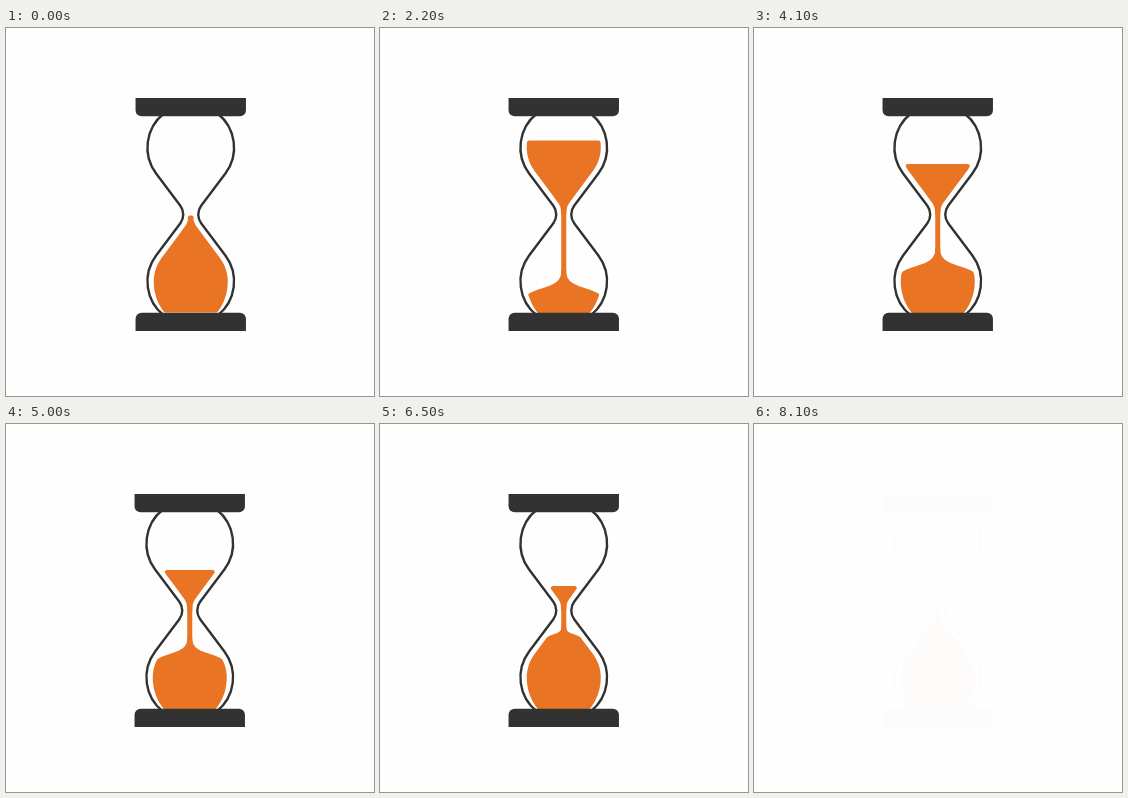
Animation, 368 px wide and 368 px high, one loop 8200 ms. Source, as an HTML page with a canvas:

```html
<!DOCTYPE html>
<html lang="en">
<head>
<meta charset="utf-8">
<title>Hourglass</title>
<style>
html, body { margin: 0; width: 100%; height: 100%; overflow: hidden; background: #fefefe; }
canvas { display: block; width: 368px; height: 368px; }
</style>
</head>
<body>
<canvas id="stage"></canvas>
<script>
const SIZE = 368, LOOP = 8200, STEP = 100;
const DARK = '#323232', SAND = '#e87424', PAPER = '#fefefe';
const canvas = document.getElementById('stage');
const ctx = canvas.getContext('2d');
const scale = Math.max(1, window.devicePixelRatio || 1);
canvas.width = canvas.height = SIZE * scale;

// Geometry is measured from the neck; the bulbs sit above and below it.
const BULB_Y = 67, GLASS_R = 43.3, SAND_R = 37, SAND_RY = 43, STREAM = 2.5, ROUND = 2;

// Distance of each sand surface from the neck, as [seconds, distance].
const LEVEL = [[0, 98], [1, 86.5], [2.2, 74], [4.1, 50.5], [5, 40.5], [6.5, 24.5], [7.3, 14], [7.8, 2.5]];
const MOUND = [[0.4, 99], [1, 91.5], [2.2, 79.5], [4.1, 57.5], [5, 48.5], [6.5, 26.5], [7.8, 11]];
const TIP = [[0.25, -3], [0.75, 98]];
const FADE = [[7.9, 1], [8, 0.4], [8.1, 0.012]];

function track(keys, t) {
  if (t <= keys[0][0]) return keys[0][1];
  for (let i = 1; i < keys.length; i++) {
    const [t0, v0] = keys[i - 1], [t1, v1] = keys[i];
    if (t <= t1) return v0 + (v1 - v0) * (t - t0) / (t1 - t0);
  }
  return keys[keys.length - 1][1];
}

const ease = p => p < 0.5 ? 2 * p * p : 1 - 2 * (1 - p) * (1 - p);

// Half width of the sand body at distance d from the neck.
function halfWidth(d) {
  const dy = d - BULB_Y;
  if (dy > 0) return SAND_R * Math.sqrt(1 - (dy / SAND_RY) ** 2);
  if (dy > -0.6 * SAND_R) return Math.sqrt(SAND_R ** 2 - dy * dy);
  const cone = (0.6 * d - 3.2) / 0.8;
  return (cone + STREAM + Math.hypot(cone - STREAM, 2.4)) / 2;
}

// Fills a mirrored profile of [half width, y] points with softened corners.
function fillProfile(points) {
  ctx.beginPath();
  for (const [x, y] of points) ctx.lineTo(Math.max(0.3, x - ROUND), y);
  for (const [x, y] of points.slice().reverse()) ctx.lineTo(-Math.max(0.3, x - ROUND), y);
  ctx.closePath();
  ctx.fill();
  ctx.stroke();
}

function drawUpperSand(t) {
  const top = -track(LEVEL, t) + ROUND;
  const end = Math.min(track(TIP, t), track(MOUND, t));
  const points = [];
  for (let y = top; y < end; y++) points.push([y < 0 ? halfWidth(-y) : STREAM, y]);
  points.push([end < 0 ? halfWidth(-end) : STREAM, end]);
  fillProfile(points);
}

function drawMound(t) {
  const y0 = track(MOUND, t);
  if (t < 0.6) return;
  const w = halfWidth(y0), points = [];
  for (let i = 0; i <= 24; i++) {
    const u = i / 24, v = 1 - u;
    const a = v * v * v, b = 3 * v * v * u, c = 3 * v * u * u, d = u * u * u;
    points.push([
      a * STREAM + b * STREAM + c * 0.55 * w + d * w,
      y0 + ROUND / 2 - w * (a * 0.68 + b * 0.2 + c * 0.22)
    ]);
  }
  for (let y = y0 + 2; y < 102; y++) points.push([halfWidth(y), y]);
  fillProfile(points);
}

function drawGlass() {
  const neck = 7.5;
  const offset = GLASS_R - 0.6 * BULB_Y;
  const r = (0.8 * neck - offset) / 0.2;
  const rim = Math.atan2(-34, -Math.sqrt(GLASS_R ** 2 - 34 ** 2));
  const side = Math.atan2(0.6, -0.8), bend = Math.atan2(0.6, 0.8);
  ctx.lineWidth = 2.4;
  ctx.strokeStyle = DARK;
  for (const flip of [1, -1]) {
    ctx.save();
    ctx.scale(flip, 1);
    ctx.beginPath();
    ctx.arc(0, -BULB_Y, GLASS_R, rim, side, true);
    ctx.arc(-neck - r, 0, r, -bend, bend);
    ctx.arc(0, BULB_Y, GLASS_R, -side, -rim, true);
    ctx.stroke();
    ctx.restore();
  }
}

function drawPlates() {
  ctx.fillStyle = DARK;
  for (const flip of [1, -1]) {
    ctx.save();
    ctx.scale(1, flip);
    ctx.beginPath();
    ctx.moveTo(-55.2, -116.5);
    ctx.lineTo(55.2, -116.5);
    ctx.arcTo(55.2, -98.3, 40, -98.3, 6);
    ctx.arcTo(-55.2, -98.3, -55.2, -116.5, 6);
    ctx.closePath();
    ctx.fill();
    ctx.restore();
  }
}

function draw(ms) {
  const t = ms / 1000;
  ctx.setTransform(scale, 0, 0, scale, 0, 0);
  ctx.globalAlpha = 1;
  ctx.fillStyle = PAPER;
  ctx.fillRect(0, 0, SIZE, SIZE);
  ctx.translate(184.25, 186.5);
  ctx.rotate(Math.PI * (ease(Math.min(1, t / 0.75)) - 1));
  ctx.translate(-0.5, 0);
  ctx.fillStyle = ctx.strokeStyle = SAND;
  ctx.lineWidth = 2 * ROUND;
  ctx.lineJoin = 'round';
  drawUpperSand(t);
  drawMound(t);
  drawGlass();
  drawPlates();

  // Fade the whole picture to paper at the end of the loop.
  ctx.setTransform(scale, 0, 0, scale, 0, 0);
  ctx.globalAlpha = 1 - track(FADE, t);
  ctx.fillStyle = PAPER;
  ctx.fillRect(0, 0, SIZE, SIZE);
}

const start = performance.now();
function tick() {
  const ms = (performance.now() - start) % LOOP;
  draw(Math.floor(ms / STEP) * STEP);
  requestAnimationFrame(tick);
}
tick();
</script>
</body>
</html>
```
